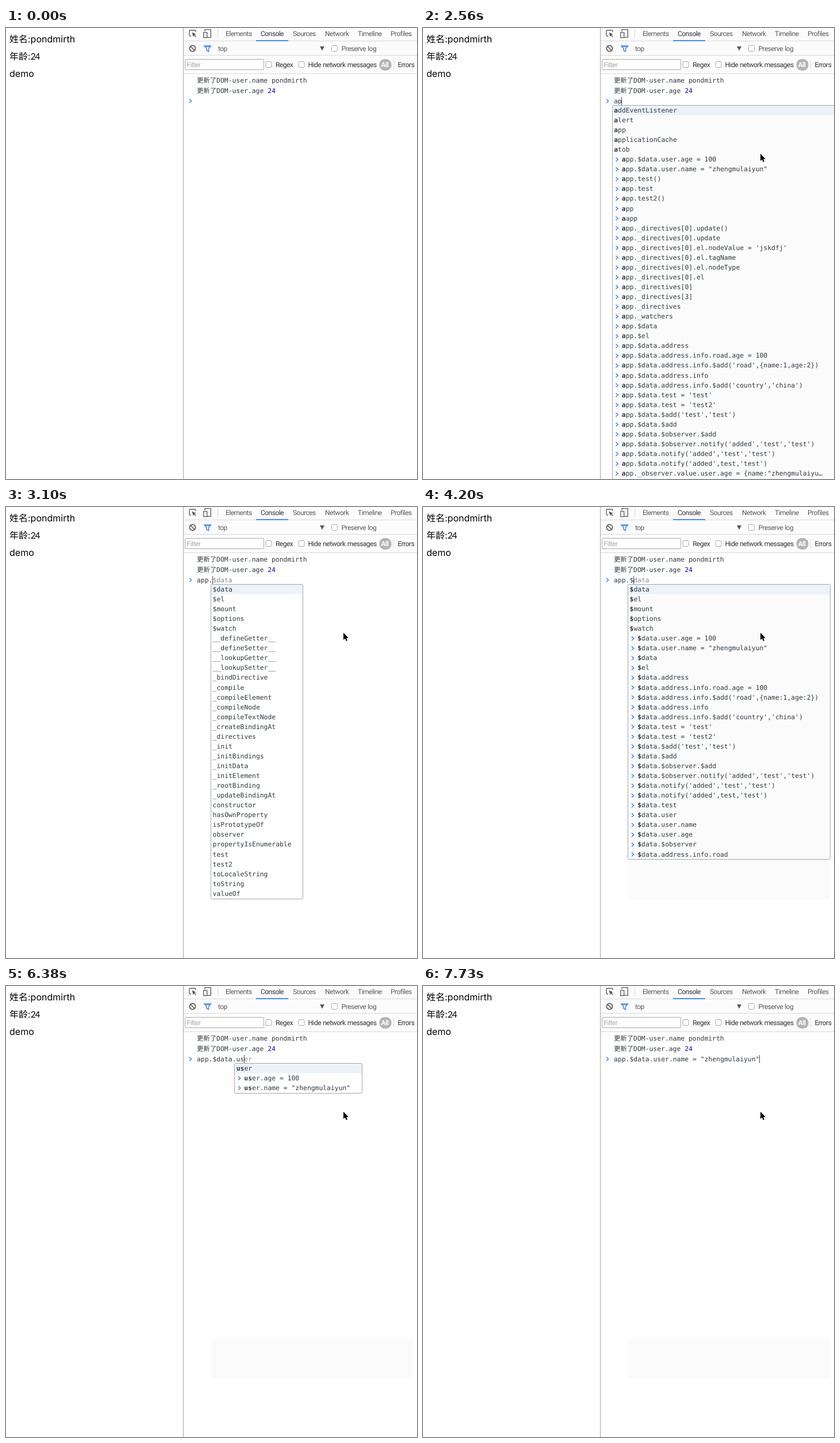
Animation, 715 px wide and 784 px high, one loop 8 s. Source, as an HTML page:

```html
<!DOCTYPE html>
<html lang="zh">
<head>
<meta charset="utf-8">
<title>Console</title>
<style>
  html, body { margin: 0; width: 100%; height: 100%; overflow: hidden; background: #fff; }
  svg { display: block; }
  text { white-space: pre; text-rendering: geometricPrecision; }
  .page { font: 16px Inter, "Noto Sans CJK SC", sans-serif; fill: #000; }
  .page .num { font: 15.5px Lato, sans-serif; letter-spacing: -1px; }
  .ui { font: 12px Roboto, sans-serif; letter-spacing: -.52px; word-spacing: .7px; fill: #5a5a5a; }
  .ui .on { fill: #333; }
  .mono { font: 11.38px "DejaVu Sans Mono", "Noto Sans CJK SC", monospace; fill: #303942; }
  .mono .b { font-weight: bold; }
  .mono .ghost { fill: #8c8c8c; }
  .mono .num { fill: #1c00cf; }
  .chev { fill: none; stroke: #4285f4; stroke-width: 1.5; }
  .line { fill: none; stroke: #d9d9d9; }
  .icon { fill: none; stroke: #5a5a5a; stroke-width: 1.3; }
  .box { fill: #fff; stroke: #a9a9a9; }
</style>
</head>
<body>
<svg width="715" height="784" viewBox="0 0 715 784">
  <rect width="715" height="784" fill="#fff"/>
  <g class="page">
    <text x="6" y="25">姓名:pondmirth</text>
    <text x="6" y="55">年龄:<tspan class="num">24</tspan></text>
    <text x="6" y="85.3">demo</text>
  </g>

  <rect x="309" width="406" height="79" fill="#fcfcfc"/>
  <path class="line" d="M309 22.5H715M309 47.5H715M309 79.5H715M368.5 2V18M674.5 56V72"/>
  <path d="M308.5 0V784" stroke="#a3a3a3"/>
  <rect x="435" y="21" width="56" height="2" fill="#4a8af0"/>

  <g class="icon">
    <path d="M322 14H320.5Q319 14 319 12.5V5.5Q319 4 320.5 4H328.5Q330 4 330 5.5V7"/>
    <path d="M323.5 7.5L331 11L328 12L330.8 15L329.8 16L327 13L325.7 15.6Z" fill="#5a5a5a" stroke="none"/>
    <path d="M346 6V2.7H356.3V16.3H350"/>
    <rect x="343.7" y="7.7" width="6" height="9" fill="#fcfcfc"/>
    <g stroke-width="1.7"><circle cx="324.5" cy="35.5" r="5.1"/><path d="M321 32L328 39"/></g>
    <path d="M345 31H356.4L352.5 35.8V41L349 39V35.8Z" stroke="#4285f4" stroke-width="1.5"/>
    <path d="M346 32.5H355.4" stroke="#4285f4"/>
  </g>
  <path d="M546 32H554L550 39.5Z" fill="#5a5a5a"/>

  <g class="box">
    <rect x="311.5" y="54.5" width="137" height="18" rx="1"/>
    <rect x="566.5" y="30.5" width="10" height="10" rx="2"/>
    <rect x="452" y="58.5" width="10" height="10" rx="2"/>
    <rect x="509" y="58.5" width="10" height="10" rx="2"/>
  </g>
  <rect x="649.5" y="54" width="21" height="20" rx="9" fill="#b3b3b3"/>
  <g class="ui" id="labels"></g>

  <g class="mono">
    <text x="332" y="95">更新了DOM-user.name pondmirth</text>
    <text x="332" y="113">更新了DOM-user.age <tspan class="num">24</tspan></text>
  </g>
  <path class="chev" d="M319 123.7L322.6 127L319 130.3"/>
  <rect id="patch" x="357" y="613" width="351" height="69" fill="#fbfbfb"/>
  <g class="mono" id="prompt"></g>
  <rect id="caret" y="120" width="1" height="14" fill="#444"/>
  <g class="mono" id="popup"></g>
  <path id="mouse" d="M0 0V12.6L2.9 9.9L4.8 14.4L6.9 13.5L5 9.2H8.8Z" fill="#000" stroke="#fff" stroke-width="1.2" paint-order="stroke"/>
</svg>
<script>
const LOOP = 8000, CHAR = 6.85, ROW = 17.06, TOP = 134.5, LEFT = 332;
const NAME = '"zhengmulaiyun"';
const el = id => document.getElementById(id);
const esc = s => s.replace(/&/g, '&amp;').replace(/</g, '&lt;');
const words = s => s.trim().split(/\s+/);

const label = (x, y, s, more = '') => `<text x="${x}" y="${y}" ${more}>${s}</text>`;
el('labels').innerHTML =
  [[382, 'Elements'], [443, 'Console'], [499, 'Sources'], [555, 'Network'], [612, 'Timeline'], [669, 'Profiles']]
    .map(([x, s]) => label(x, 14.3, s, s === 'Console' ? 'class="on"' : '')).join('') +
  label(369, 40, 'top') + label(583.5, 40, 'Preserve log') +
  label(314.5, 68.3, 'Filter', 'style="fill:#a9a9a9"') +
  [[469, 'Regex'], [525.5, 'Hide network messages'], [681.5, 'Errors']]
    .map(([x, s]) => label(x, 68.3, s, 'class="on"')).join('') +
  label(652.5, 68.3, 'All', 'style="fill:#fff;font-weight:bold"');

// Earlier commands, newest first; a leading ">" marks a history row.
const dataCalls = [
  "address", "address.info.road.age = 100", "address.info.$add('road',{name:1,age:2})",
  "address.info", "address.info.$add('country','china')", "test = 'test'", "test = 'test2'",
  "$add('test','test')", "$add", "$observer.$add", "$observer.notify('added','test','test')",
  "notify('added','test','test')", "notify('added',test,'test')"
].map(s => '$data.' + s);
const userCalls = ['user.age = 100', 'user.name = ' + NAME];
const directives = [
  '[0].update()', '[0].update', "[0].el.nodeValue = 'jskdfj'", '[0].el.tagName',
  '[0].el.nodeType', '[0].el', '[0]', '[3]', ''
].map(s => '_directives' + s);
const past = list => list.map(s => '>' + s);
const onApp = list => past(list.map(s => 'app.' + s));

const history = [
  ...onApp(userCalls.map(s => '$data.' + s)), ...onApp(['test()', 'test', 'test2()']),
  '>app', '>aapp', ...onApp(directives), ...onApp(['_watchers', '$data', '$el']),
  ...onApp(dataCalls), '>app._observer.value.user.age = {name:"zhengmulaiyu…'
];
const lists = {
  a: [...words('addEventListener alert app applicationCache atob'), ...history],
  ap: ['app', 'applicationCache', ...history.filter(s => s !== '>aapp'),
    ...onApp(['_observer.value.user.age', '_observer.value.user', '_observer.value', '_observer'])],
  app: words(`$data $el $mount $options $watch __defineGetter__ __defineSetter__ __lookupGetter__
    __lookupSetter__ _bindDirective _compile _compileElement _compileNode _compileTextNode
    _createBindingAt _directives _init _initBindings _initData _initElement _rootBinding
    _updateBindingAt constructor hasOwnProperty isPrototypeOf observer propertyIsEnumerable
    test test2 toLocaleString toString valueOf`),
  dollar: [...words('$data $el $mount $options $watch'),
    ...past([...userCalls.map(s => '$data.' + s), '$data', '$el', ...dataCalls,
      '$data.test', '$data.user', '$data.user.name', '$data.user.age', '$data.$observer', '$data.address.info.road'])],
  data: words(`$add $delete $observer __defineGetter__ __defineSetter__ __lookupGetter__
    __lookupSetter__ _parent address constructor hasOwnProperty isPrototypeOf observer
    propertyIsEnumerable test toLocaleString toString user valueOf`),
  user: ['user', ...past(userCalls)]
};

// time, typed text, completion, [list, characters before the list, bold length, selected row, background]
const D = 'app.$data';
const steps = [
  [0, null],
  [680, ''],
  [1130, null],
  [1400, 'a'],
  [1430, 'a', 'ddEventListener', ['a', 0, 1, 0, '#fbfbfb']],
  [2560, 'ap', '', ['a', 0, 1, 0, '#fbfbfb']],
  [2620, 'ap', 'p', ['ap', 0, 2, 0, '#fbfbfb']],
  [2710, 'app', '', ['ap', 0, 3, 0, '#fbfbfb']],
  [3100, 'app.', '$data', ['app', 4, 0, 0]],
  [4200, 'app.$', 'data', ['dollar', 4, 1, 0, '#fbfbfb']],
  [5010, D],
  [5370, D + '.'],
  [5430, D + '.', '$add', ['data', 10, 0, 0]],
  [6170, D + '.u', '', ['data', 10, 0, 0]],
  [6200, D + '.u', 'ser', ['user', 10, 1, 0]],
  [6350, D + '.us', '', ['user', 10, 1, 0]],
  [6380, D + '.us', 'er', ['user', 10, 2, 0]],
  [7220, D + '.us', 'er.age = 100', ['user', 10, 2, 1]],
  [7400, D + '.us', 'er.name = ' + NAME, ['user', 10, 2, 2]],
  [7730, D + '.user.name = ' + NAME]
];
const mouseSteps = [[360, 683, 229], [410, 647, 226], [460, 608, 221], [510, 587, 218.5]];
const at = (list, t) => list.filter(s => s[0] <= t).pop();

function popupMarkup([key, before, bold, selected, bg = '#fff']) {
  const items = lists[key], x = LEFT + before * CHAR + .2;
  const left = Math.floor(x - 3) + .5, wide = before === 0;
  const end = Math.max(...items.map(s => s[0] === '>' ? 13.6 + (s.length - 1) * CHAR : s.length * CHAR));
  const w = wide ? 400 : Math.round(x + end + 20 - left);
  const h = wide ? 700 : Math.round(items.length * ROW + .6);
  const rows = items.map((s, i) => {
    const old = s[0] === '>', word = old ? s.slice(1) : s;
    const mid = TOP + ROW * (i + .5);
    const chev = old ? `<path class="chev" d="M${x + 3.4} ${mid - 3}l3.6 3.3l-3.6 3.3"/>` : '';
    return chev + `<text x="${x + (old ? 13.6 : 0)}" y="${mid + 3.9}"><tspan class="b">${esc(word.slice(0, bold))}</tspan>${esc(word.slice(bold))}</text>`;
  });
  return `<rect x="${left}" y="${TOP}" width="${w}" height="${h}" rx="2" fill="${bg}"/>` +
    `<rect x="${left + .5}" y="${TOP + selected * ROW}" width="${w - 1}" height="${ROW}" fill="#ebf2fa"/>` +
    `<rect x="${left}" y="${TOP}" width="${w}" height="${h}" rx="2" fill="none" stroke="#a6a6a6"/>` + rows.join('');
}

let shown;
function draw(t) {
  const m = at(mouseSteps, t);
  el('mouse').setAttribute('visibility', m ? 'visible' : 'hidden');
  if (m) el('mouse').setAttribute('transform', `translate(${m[1]} ${m[2]})`);

  const step = at(steps, t);
  if (step === shown) return;
  shown = step;
  const [time, typed, ghost = '', popup] = step;
  el('patch').setAttribute('visibility', time >= 4200 ? 'visible' : 'hidden');
  el('caret').setAttribute('visibility', typed === null ? 'hidden' : 'visible');
  el('caret').setAttribute('x', Math.floor(LEFT + (typed || '').length * CHAR));
  el('prompt').innerHTML = `<text x="${LEFT}" y="131">${esc(typed || '')}<tspan class="ghost">${esc(ghost)}</tspan></text>`;
  el('popup').innerHTML = popup ? popupMarkup(popup) : '';
}

const start = performance.now();
function frame() {
  draw((performance.now() - start) % LOOP);
  requestAnimationFrame(frame);
}
draw(0);
requestAnimationFrame(frame);
</script>
</body>
</html>
```
